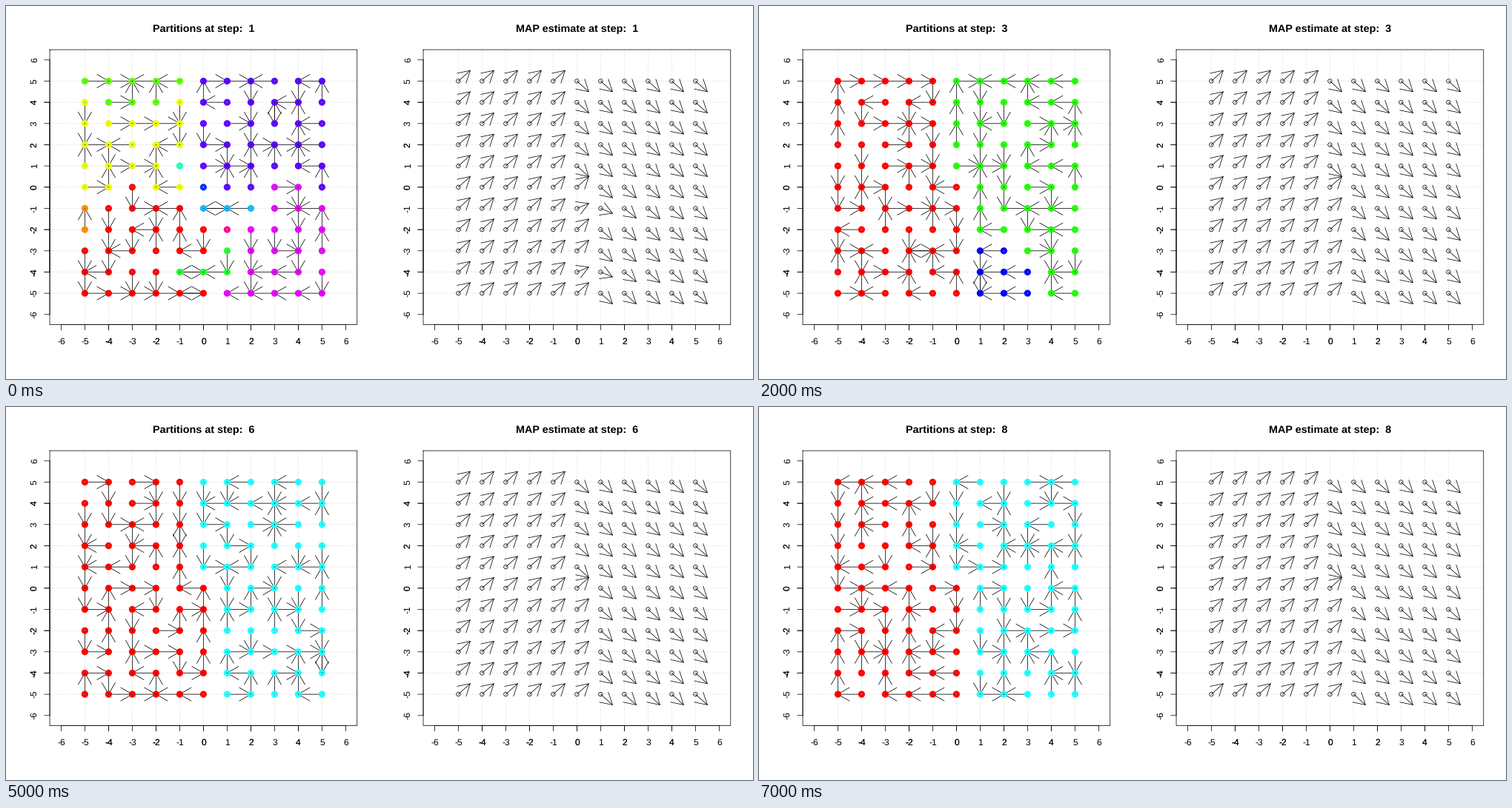
Animation of 1008x504 px, one loop 8 s. Source, as a matplotlib script:

```python
import colorsys
import math
import random

import matplotlib.pyplot as plt
from matplotlib.animation import FuncAnimation
from matplotlib.collections import LineCollection

plt.rcParams["font.family"] = "Liberation Sans"
plt.rcParams["text.hinting"] = "none"

WIDTH, HEIGHT, DPI = 1008, 504, 72
STEPS, STEP_MS = 8, 1000
UNIT_X, UNIT_Y = 32, 28.667
LEFT_X, RIGHT_X, CENTER_Y = 266.4, 770.4, 244.8
HALF_W, TOP, BOTTOM = 207.36, 59.04, 430.56
LINE = 0.75
HEAD, HEAD_ANGLE = 18, math.radians(30)
CELLS = [(x, y) for y in range(-5, 6) for x in range(-5, 6)]


def to_pixel(center_x, x, y):
    return center_x + UNIT_X * x, CENTER_Y - UNIT_Y * y


def arrow(center_x, start, end):
    """Shaft and open head as two polylines."""
    x0, y0 = to_pixel(center_x, *start)
    x1, y1 = to_pixel(center_x, *end)
    back = math.atan2(y0 - y1, x0 - x1)
    barbs = [(x1 + HEAD * math.cos(back + a), y1 + HEAD * math.sin(back + a))
             for a in (-HEAD_ANGLE, HEAD_ANGLE)]
    return [[(x0, y0), (x1, y1)], [barbs[0], (x1, y1), barbs[1]]]


def on_left(x, y):
    return x < 0 or (x == 0 and y <= 0)


def many_clusters(x, y):
    strays = {(-3, 0): 0, (-1, 1): 5, (0, 0): 7, (1, -2): 10, (1, -3): 4}
    if (x, y) in strays:
        return strays[x, y]
    if y == -4 and abs(x) <= 1:
        return 4
    if y == -1 and 0 <= x <= 2:
        return 6
    if on_left(x, y):
        if y >= 4 and abs(x + 3) <= y - 3:
            return 3
        if y >= 0:
            return 2
        return 1 if x == -5 and y >= -2 else 0
    return 9 if y < 0 or (y == 0 and 3 <= x <= 4) else 8


def four_clusters(x, y):
    if on_left(x, y):
        return 1 if y > 3 or (y == 3 and x > -5) else 0
    return 3 if y < -1 or (y == -1 and x > 2) else 2


def three_clusters(x, y):
    if on_left(x, y):
        return 0
    return 2 if x <= 3 and y <= -3 and x + y < 0 else 1


def two_clusters(x, y):
    return 0 if on_left(x, y) else 1


def label_cells(step):
    stages = many_clusters, four_clusters, three_clusters, two_clusters
    cluster = stages[min(step, len(stages)) - 1]
    return {cell: cluster(*cell) for cell in CELLS}


def random_links(labels, rng):
    """Join each cluster by a uniform random tree of links to neighbours."""
    def neighbours(cell):
        x, y = cell
        around = [(x + 1, y), (x - 1, y), (x, y + 1), (x, y - 1)]
        return [c for c in around if labels.get(c) == labels[cell]]

    links = {}
    for label in sorted(set(labels.values())):
        members = [c for c in CELLS if labels[c] == label]
        root = rng.choice(members)
        joined, walk = {root}, {}
        for member in members:
            cell = member
            while cell not in joined:
                walk[cell] = rng.choice(neighbours(cell))
                cell = walk[cell]
            cell = member
            while cell not in joined:
                joined.add(cell)
                links[cell] = walk[cell]
                cell = walk[cell]
        sources = [c for c in members if links.get(c) == root]
        if sources and rng.random() < 0.3:
            links[root] = rng.choice(sources)
    return links


def partition_arrows(labels, step):
    links = random_links(labels, random.Random(step))
    return [line for start, end in links.items()
            for line in arrow(LEFT_X, start, end)]


def field_arrows(step):
    lines = []
    for x, y in CELLS:
        rise = 0.5 if on_left(x, y) else -0.5
        if step == 1 and y in (-1, -4):
            # The border is still soft in these rows
            rise = 0.5 * math.tanh(0.5 - x)
        lines += arrow(RIGHT_X, (x, y), (x + 0.5, y + rise))
    return lines


def rainbow(count):
    """Evenly spaced hues, with greens slightly warmed."""
    colors = []
    for i in range(count):
        r, g, b = colorsys.hsv_to_rgb(i / count, 1, 1)
        colors.append((max(r, 0.12 * g), g, b))
    return colors


fig = plt.figure(figsize=(WIDTH / DPI, HEIGHT / DPI), dpi=DPI, facecolor="white")
ax = fig.add_axes([0, 0, 1, 1])
ax.set(xlim=(0, WIDTH), ylim=(HEIGHT, 0))
ax.axis("off")


def stroke(points, **style):
    xs, ys = zip(*points)
    options = dict(color="black", lw=LINE, snap=False, zorder=2)
    ax.plot(xs, ys, **{**options, **style})


def draw_axes(center_x, values):
    left = center_x - HALF_W
    ends = [to_pixel(center_x, v, v) for v in (values[0], values[-1])]
    stroke([(x, BOTTOM) for x, _ in ends])
    stroke([(left, y) for _, y in ends])
    for value in values:
        x, y = to_pixel(center_x, value, value)
        stroke([(x, BOTTOM), (x, BOTTOM + 7.2)])
        stroke([(left, y), (left - 7.2, y)])
        style = dict(size=12, ha="center", va="baseline")
        ax.text(x, 457.2, str(value), **style)
        ax.text(left - 17.2, y, str(value), rotation=90,
                rotation_mode="anchor", **style)


def draw_panel(center_x):
    left, right = center_x - HALF_W, center_x + HALF_W
    stroke([(left, TOP), (right, TOP), (right, BOTTOM), (left, BOTTOM),
            (left, TOP)])
    dotted = dict(color="lightgray", ls=(0, (1, 3)), dash_capstyle="round",
                  zorder=1)
    for value in range(-5, 6):
        x, y = to_pixel(center_x, value, value)
        stroke([(x, BOTTOM), (x, TOP)], **dotted)
        stroke([(left, y), (right, y)], **dotted)
    # A fine axis over a coarse one darkens the shared labels
    draw_axes(center_x, range(-6, 7))
    draw_axes(center_x, range(-4, 5, 2))
    return ax.text(center_x, 35, "", size=14.4, weight="bold", ha="center",
                   va="baseline")


def draw_arrows():
    return ax.add_collection(LineCollection(
        [], colors="black", linewidths=LINE, capstyle="round",
        joinstyle="round", snap=False, zorder=3))


def draw_rings(center_x, width):
    xs, ys = zip(*(to_pixel(center_x, *cell) for cell in CELLS))
    return ax.scatter(xs, ys, s=5.4 ** 2, facecolors="none", edgecolors="black",
                      linewidths=width, snap=False, zorder=4)


left_title, right_title = draw_panel(LEFT_X), draw_panel(RIGHT_X)
link_lines, field_lines = draw_arrows(), draw_arrows()
dots = draw_rings(LEFT_X, 3.75)
draw_rings(RIGHT_X, LINE)


def update(frame):
    step = frame + 1
    labels = label_cells(step)
    colors = rainbow(max(labels.values()) + 1)
    left_title.set_text(f"Partitions at step:  {step}")
    right_title.set_text(f"MAP estimate at step:  {step}")
    link_lines.set_segments(partition_arrows(labels, step))
    field_lines.set_segments(field_arrows(step))
    dots.set_edgecolor([colors[labels[cell]] for cell in CELLS])
    return left_title, right_title, link_lines, field_lines, dots


animation = FuncAnimation(fig, update, frames=STEPS, interval=STEP_MS,
                          repeat=True, repeat_delay=0)
plt.show()
```
